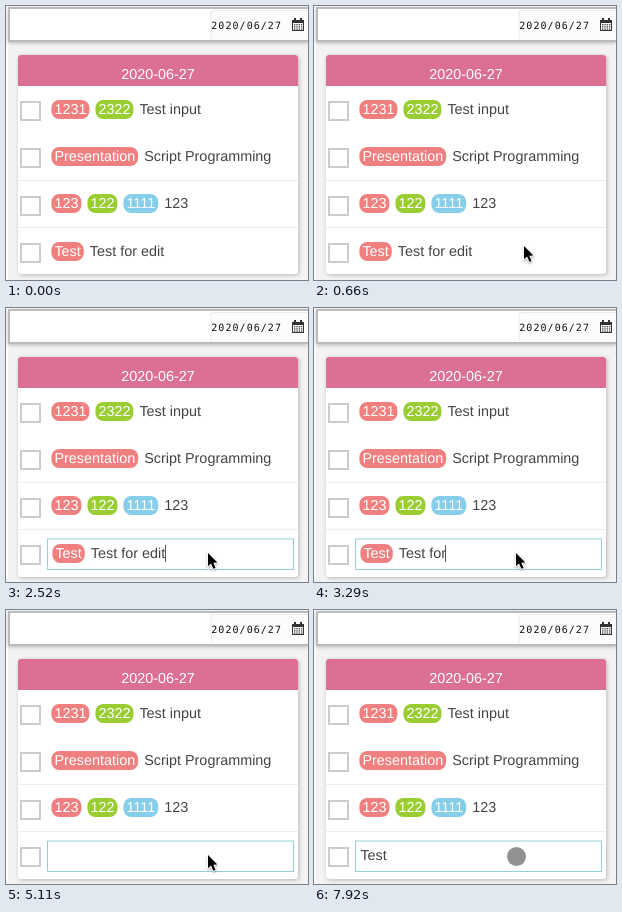
An HTML page with a canvas for the animation above (8000 ms loop, 302x274 px).

```html
<!DOCTYPE html>
<html lang="en">
<head>
<meta charset="utf-8">
<title>To-do list editing</title>
<style>
  html, body { margin: 0; width: 100%; height: 100%; overflow: hidden; background: #fff; }
  canvas { display: block; }
</style>
</head>
<body>
<canvas id="stage" width="302" height="274"></canvas>
<script>
const ctx = document.getElementById('stage').getContext('2d');
const LOOP = 8000;
const SANS = '14.4px "Liberation Sans", Arial, sans-serif';
const MONO = '10px "DejaVu Sans Mono", monospace';
const CORAL = '#f08080', GREEN = '#9acd32', BLUE = '#87ceeb';
const INK = '#444';
const PITCH = 47.2;

const ROWS = [
  { tags: [['1231', CORAL], ['2322', GREEN]], text: 'Test input' },
  { tags: [['Presentation', CORAL]], text: 'Script Programming' },
  { tags: [['123', CORAL], ['122', GREEN], ['1111', BLUE]], text: '123' }
];

const PHRASE = 'Test for edit';
const FOCUS_AT = 930, CARET_AT = 1570, BLINK = 470;
const POINTER_OFF = 6690, DOT_ON = 7000;

// Evenly spaced key presses; the final erase removes the tag.
const ERASE = [
  { from: 2790, gap: 115, keys: 3 },
  { from: 3170, gap: 110, keys: 6 },
  { from: 3860, gap: 192, keys: 5 }
];
const TYPE = { from: 6930, gap: 160, keys: 4 };

// Each move eases out from where the previous one ended.
const ENTRY = { x: 299, y: 236 };
const MOVES = [
  { from: 60, to: 660, x: 210, y: 240, lift: 7 },
  { from: 1200, to: 1360, x: 191, y: 244, lift: 0 },
  { from: 1720, to: 1830, x: 202, y: 245, lift: 0 }
];

const clamp = (v, lo, hi) => Math.min(hi, Math.max(lo, v));

function rect(x, y, w, h, color) {
  ctx.fillStyle = color;
  ctx.fillRect(x, y, w, h);
}

function frame(x, y, w, h, line, color) {
  ctx.lineWidth = line;
  ctx.strokeStyle = color;
  ctx.strokeRect(x + line / 2, y + line / 2, w - line, h - line);
}

function round(x, y, w, h, r, color) {
  ctx.fillStyle = color;
  ctx.beginPath();
  ctx.roundRect(x, y, w, h, r);
  ctx.fill();
}

function shadowed(alpha, blur, dx, dy, paint) {
  ctx.save();
  ctx.shadowColor = `rgba(0,0,0,${alpha})`;
  ctx.shadowBlur = blur;
  ctx.shadowOffsetX = dx;
  ctx.shadowOffsetY = dy;
  paint();
  ctx.restore();
}

function write(text, x, y, color, font = SANS) {
  ctx.font = font;
  ctx.fillStyle = color;
  ctx.fillText(text, x, y);
}

function widthOf(text) {
  ctx.font = SANS;
  return ctx.measureText(text).width;
}

function drawTag(text, color, x, base) {
  const w = widthOf(text) + 6;
  round(x, base - 14, w, 19, 8, color);
  write(text, x + 3, base, '#fff');
  return x + w + 6;
}

function drawTags(tags, x, base) {
  for (const [text, color] of tags) x = drawTag(text, color, x, base);
  return x;
}

function drawCheckbox(row) {
  const y = Math.round(95 + row * 47.4);
  rect(14, y, 21, 20, '#fff');
  frame(14, y, 21, 20, 2, '#ccc');
}

function drawCalendar(x, y) {
  const ink = '#333';
  frame(x, y + 2, 12, 11, 1, ink);
  rect(x, y + 2, 12, 3, ink);
  for (const dx of [2, 8]) rect(x + dx, y, 2, 4, ink);
  for (let r = 0; r < 3; r++) {
    for (let c = 0; c < 4; c++) rect(x + 2 + c * 2.3, y + 6 + r * 2.2, 1.4, 1.4, '#555');
  }
}

function drawBar() {
  shadowed(0.25, 4, 0, 1, () => rect(2, 1, 300, 35, '#bbb'));
  rect(4, 3, 298, 31, '#fff');
  round(204.5, 4, 100, 30, 3, '#ebebeb');
  round(205.5, 5, 100, 29, 3, '#fcfcfc');
  ctx.letterSpacing = '1.05px';
  write('2020/06/27', 205.3, 23, '#111', MONO);
  ctx.letterSpacing = '0px';
  drawCalendar(286, 12);
}

function drawCard(focused) {
  shadowed(0.25, 4, 1, 1, () => round(12, 49, 280, focused ? 220 : 219, 3, '#fff'));
  round(12, 49, 280, 31, [3, 3, 0, 0], '#db7093');
  const title = '2020-06-27';
  write(title, 152 - widthOf(title) / 2, 73, '#fff');
  for (const row of [2, 3]) rect(12, Math.round(79 + row * 47.4), 280, 1, '#eee');
}

function pressed({ from, gap, keys }, t) {
  return clamp(Math.floor((t - from) / gap) + 1, 0, keys);
}

function caretOn(t) {
  let since = CARET_AT;
  for (const burst of [...ERASE, TYPE]) {
    const n = pressed(burst, t);
    if (n) since = burst.from + (n - 1) * burst.gap;
  }
  return t >= since && Math.floor((t - since) / BLINK) % 2 === 0;
}

function drawEditRow(t) {
  const focused = t >= FOCUS_AT;
  const base = Math.round(108 + 3 * PITCH);
  const erased = ERASE.reduce((sum, burst) => sum + pressed(burst, t), 0);
  const left = PHRASE.length - erased;
  let x = focused ? 46.4 : 45.4;
  drawCheckbox(3);
  if (focused) frame(41, 230.5, 247, 31.5, 1, '#96d0d6');
  if (left >= 0) x = drawTag('Test', CORAL, x, base);
  const text = PHRASE.slice(0, Math.max(left, 0) + pressed(TYPE, t));
  write(text, x, base, INK);
  if (caretOn(t)) rect(Math.floor(x + widthOf(text)), 237, 1, 17, '#555');
}

function pointerAt(t) {
  let { x, y } = ENTRY;
  for (const m of MOVES) {
    const k = clamp((t - m.from) / (m.to - m.from), 0, 1);
    const eased = 1 - (1 - k) ** 2;
    x += (m.x - x) * eased;
    y += (m.y - y) * eased - m.lift * Math.sin(Math.PI * k);
  }
  return [x, y];
}

function drawPointer(t) {
  if (t >= DOT_ON) {
    ctx.fillStyle = '#929292';
    ctx.beginPath();
    ctx.arc(202.5, 246.5, 9.5, 0, Math.PI * 2);
    ctx.fill();
  }
  if (t < MOVES[0].from || t >= POINTER_OFF) return;
  ctx.save();
  ctx.translate(...pointerAt(t));
  ctx.scale(0.92, 0.92);
  const arrow = new Path2D('M0 0V14.4L3.3 11.4L5.8 17.2L8.2 16.2L5.8 10.6L10.2 10.4Z');
  ctx.lineWidth = 2;
  ctx.lineJoin = 'round';
  ctx.strokeStyle = '#fff';
  shadowed(0.35, 2, 0, 1, () => ctx.stroke(arrow));
  ctx.fillStyle = '#000';
  ctx.fill(arrow);
  ctx.restore();
}

function draw(t) {
  rect(0, 0, 302, 274, '#fff');
  rect(2, 36, 300, 238, '#f3f3f3');
  drawBar();
  drawCard(t >= FOCUS_AT);
  ROWS.forEach((row, i) => {
    const base = Math.round(108 + i * PITCH);
    drawCheckbox(i);
    write(row.text, drawTags(row.tags, 45.4, base), base, INK);
  });
  drawEditRow(t);
  drawPointer(t);
}

ctx.fontKerning = 'normal';
ctx.textRendering = 'geometricPrecision';
const start = performance.now();

function tick() {
  draw((performance.now() - start) % LOOP);
  requestAnimationFrame(tick);
}
tick();
</script>
</body>
</html>
```
